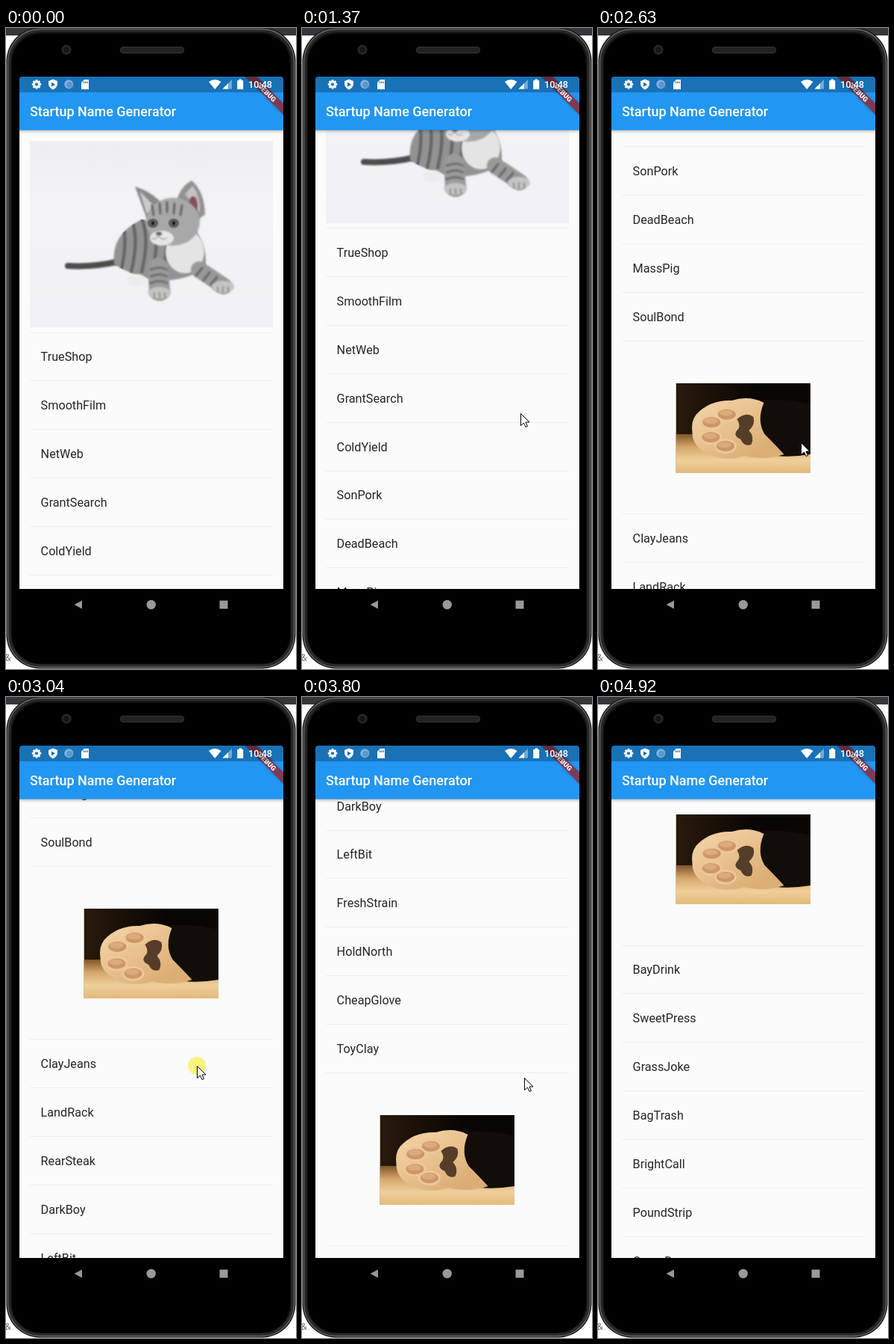
An HTML page with a canvas that plays this animation: 389 by 857 pixels, repeating every 5650 ms.

```html
<!DOCTYPE html>
<html lang="en">
<head>
<meta charset="utf-8">
<title>Startup Name Generator</title>
<style>
html, body { margin: 0; width: 100%; height: 100%; overflow: hidden; background: #fff; }
canvas { display: block; width: 389px; height: 857px; }
</style>
</head>
<body>
<canvas id="stage"></canvas>
<script>
const W = 389, H = 857, LOOP = 5650;
const ROW = 64.9, PHOTO_ROW = 231, FIRST = 407;
const STEP = 69.5, PHASE = 1366, ENTER = 130, LEAVE = 4920;
const COAST_TIME = 120;
const FONT = 'Roboto, "Open Sans", sans-serif';
const dpr = window.devicePixelRatio || 1;

const names = `TrueShop SmoothFilm NetWeb GrantSearch ColdYield SonPork DeadBeach MassPig SoulBond *
  ClayJeans LandRack RearSteak DarkBoy LeftBit FreshStrain HoldNorth CheapGlove ToyClay *
  BayDrink SweetPress GrassJoke BagTrash BrightCall PoundStrip GameDoor`.split(/\s+/);

const swipes = [
  { down: 1150, up: 1340, pull: 93.4, coast: 236.6 },
  { down: 2250, up: 2440, pull: 150, coast: 120 },
  { down: 2850, up: 3040, pull: 176, coast: 190 },
  { down: 3430, up: 3620, pull: 170, coast: 217 },
  { down: 4030, up: 4220, pull: 195.7, coast: 157 }
];

// Pointer stops: time, x, y
const stops = [[130, 361, 846], [620, 290, 694], [1150, 290, 690], [1340, 293, 515],
  [2200, 289, 662], [2440, 272, 490], [2850, 272, 650], [3040, 256, 493], [3430, 276, 680],
  [3620, 298, 509], [3800, 298, 509], [4030, 306, 655], [4220, 298, 510], [4480, 304, 506],
  [4880, 374, 846]];

let g;

function surface(canvas, w, h) {
  canvas.width = Math.round(w * dpr);
  canvas.height = Math.round(h * dpr);
  const c = canvas.getContext('2d');
  c.scale(dpr, dpr);
  return c;
}

// The screen refreshes at a fixed rate once the pointer has entered
function snap(t) {
  if (t < ENTER) return 0;
  return PHASE + Math.floor((Math.min(t, LEAVE) - PHASE) / STEP) * STEP;
}

// A finger accelerates the list, then it coasts to rest
function scrollAt(t) {
  let sum = 0;
  for (const { down, up, pull, coast } of swipes) {
    if (t <= down) break;
    sum += pull * Math.min(1, (t - down) / (up - down)) ** 2;
    if (t > up) sum += coast * (1 - Math.exp((up - t) / COAST_TIME));
  }
  return sum;
}

function pointerAt(t) {
  const next = stops.findIndex(s => s[0] > t);
  if (next === 0) return stops[0].slice(1);
  if (next < 0) return stops[stops.length - 1].slice(1);
  const a = stops[next - 1], b = stops[next];
  const u = (t - a[0]) / (b[0] - a[0]), e = u * u * (3 - 2 * u);
  return [1, 2].map(i => Math.round(a[i] + (b[i] - a[i]) * e));
}

function rect(x, y, w, h, color) {
  g.fillStyle = color;
  g.fillRect(x, y, w, h);
}
function fill(d, color) {
  g.fillStyle = color;
  g.fill(new Path2D(d));
}
function line(d, color, width) {
  g.strokeStyle = color;
  g.lineWidth = width;
  g.stroke(new Path2D(d));
}
function oval(x, y, rx, ry, color, turn = 0) {
  g.fillStyle = color;
  g.beginPath();
  g.ellipse(x, y, rx, ry, turn, 0, Math.PI * 2);
  g.fill();
}
function ring(x, y, w, h, r, color, width) {
  g.strokeStyle = color;
  g.lineWidth = width;
  g.beginPath();
  g.roundRect(x, y, w, h, r);
  g.stroke();
}
function panel(x, y, w, h, r, color) {
  g.fillStyle = color;
  g.beginPath();
  g.roundRect(x, y, w, h, r);
  g.fill();
}
function text(s, x, y, font, color) {
  g.font = font + ' ' + FONT;
  g.fillStyle = color;
  g.fillText(s, x, y);
}
function fade(x0, y0, x1, y1, ...colors) {
  const f = g.createLinearGradient(x0, y0, x1, y1);
  colors.forEach((c, i) => f.addColorStop(i / (colors.length - 1), c));
  return f;
}

function kitten() {
  rect(0, 0, 326, 249, fade(0, 0, 0, 249, '#eeeef2', '#f3f3f6', '#f2f2f6', '#f0f0f6'));
  g.filter = `blur(${0.9 * dpr}px)`;
  g.lineCap = 'round';
  line('M51 167Q85 169 120 161', '#4c4c4c', 8);

  const body = 'M113 165Q108 125 150 105L220 115Q240 145 235 170Q180 205 113 165Z';
  fill(body, '#929292');
  g.save();
  g.clip(new Path2D(body));
  for (let x = 120; x < 190; x += 14) line(`M${x} 100q14 25 2 75`, '#636363', 4);
  g.restore();
  oval(208, 148, 26, 29, '#e4e4e4');
  oval(143, 186, 13, 8, '#ececec');
  line('M172 170L174 200', '#9a9a9a', 28);
  line('M227 172L260 194', '#999', 22);
  for (let i = 0; i < 3; i++) {
    line(`M162 ${172 + i * 9}q12 -5 22 0`, '#666', 2.5);
    line(`M${231 + i * 10} ${170 + i * 6}l-8 10`, '#666', 3);
  }
  for (const [x, y] of [[174, 203], [259, 195]]) {
    oval(x, y, 15, 8, '#c4c4c4');
    for (let i = -1; i < 2; i++) line(`M${x + i * 7} ${y}v7`, '#747474', 1.3);
  }

  fill('M141 61Q166 69 178 85L158 107Z', '#898989');
  fill('M147 67L168 88L157 98Z', '#ccc');
  fill('M197 79Q203 60 217 53Q234 67 235 98L220 110Z', '#929292');
  fill('M208 71L218 60Q229 72 228 96Z', '#c6c1c3');
  oval(219, 86, 6, 12, '#85515e');
  oval(192, 108, 36, 32, '#a8a8a8');
  for (let i = -2; i < 3; i++) line(`M${184 + i * 10} ${82 + Math.abs(i) * 2}l${-i} 13`, '#666', 3);
  oval(177, 130, 16, 10, '#e6e6e6');
  for (const x of [165, 193]) {
    oval(x, 110, 6.5, 5.5, '#303030');
    oval(x, 110, 4.8, 4.2, '#858989');
    oval(x, 110, 2.5, 3, '#111');
  }
  oval(173, 124, 4, 2.5, '#6c5c60');
  line('M173 127q-5 6 -9 3m9 -3q4 7 10 3', '#777', 1);
  g.filter = 'none';
}

function paw(top, t) {
  const bend = (1 - Math.cos((t - 3040) / 1180 * Math.PI * 2)) / 2;
  g.save();
  g.translate(104.5, top);
  g.beginPath();
  g.rect(0, 0, 180.5, 120);
  g.clip();
  rect(0, 0, 181, 120, fade(0, 0, 110, 0, '#291a0b', '#080503'));
  rect(0, 68, 181, 52, fade(0, 68, 0, 120, '#7f562b', '#d5a76c', '#efcf99', '#e2b97c'));
  fill('M100 24Q140 18 181 28V95Q145 101 117 94Z', '#120d09');
  fill('M27 42Q45 22 75 23Q98 16 118 26Q108 50 119 68Q134 83 145 95Q118 104 91 97Q65 106 42 94Q22 84 22 66Q20 51 27 42Z',
    fade(40, 20, 90, 104, '#f3d2a7', '#e9c18f', '#dbae75'));

  // Four pads on an arc that closes towards the palm
  for (let i = 0; i < 4; i++) {
    const a = 4.65 - i * 0.98, r = 1 - bend * 0.14;
    const x = 70 + Math.cos(a) * 29 * r, y = 63 + Math.sin(a) * 24 * r;
    oval(x, y, 15, 10, '#edc897');
    oval(x, y, 12, 7, '#ce966a');
    oval(x - 1, y - 2, 9, 4, '#dcaa7c');
  }
  fill('M82 48Q94 37 104 45Q107 55 98 63Q106 72 101 82Q91 85 87 75Q76 70 82 63Q88 58 82 48Z', '#553d29');
  g.restore();
}

function list(scroll, t) {
  g.save();
  g.beginPath();
  g.rect(18, 136, 354, 614);
  g.clip();
  rect(18, 136, 354, 614, '#fafbfa');
  g.drawImage(photo, 32, Math.round(151 - scroll), 326, 249);
  const rule = y => rect(32, Math.round(y - 0.5), 325.5, 1, '#eee');
  let y = FIRST - scroll;
  rule(y);
  for (const name of names) {
    const isPhoto = name === '*', h = isPhoto ? PHOTO_ROW : ROW;
    if (y < 750 && y + h > 130) {
      if (isPhoto) paw(Math.round(y + 56), t);
      else text(name, 46.6, Math.round(y + 38.4), '400 16.2px', '#252525');
      rule(y + h);
    }
    y += h;
  }
  rect(18, 136, 354, 6, fade(0, 136, 0, 142, 'rgba(0,0,0,.28)', 'rgba(0,0,0,.08)', 'rgba(0,0,0,0)'));
  g.restore();
}

function phone() {
  rect(0, 0, W, H, '#fff');
  rect(0, 0, W, 10, '#37373b');
  g.font = '13px "Noto Sans Mono", monospace';
  g.fillStyle = '#777';
  g.fillText('&', -1, 846);
  panel(0.5, -0.5, 388, 857, 45, '#111');
  ring(4, 3, 381, 850, 42, '#292929', 5);
  ring(2.5, 1.5, 384, 853, 43, '#666', 1.3);
  panel(8, 8, 373, 842, 38, '#000');
  panel(153, 25, 86, 9, 4.5, '#222');
  ring(153.5, 25.5, 85, 8, 4, '#343434', 1);
  oval(81, 29, 6.5, 6.5, '#292929');
  oval(81, 29, 4, 4, '#14151a');
  fill('M91.5 771L102 765.5V776.5Z', '#999');
  oval(194.7, 771, 6.2, 6.2, '#999');
  rect(286.5, 765.5, 11, 11, '#999');
}

function statusIcons() {
  const bar = '#1971b6', white = '#fff';
  g.save();
  g.translate(41, 75.3);
  for (let i = 0; i < 8; i++) {
    rect(-1.4, -6.2, 2.8, 4, white);
    g.rotate(Math.PI / 4);
  }
  g.restore();
  oval(41, 75.3, 4.8, 4.8, white);
  oval(41, 75.3, 2.1, 2.1, bar);
  fill('M63 68.5l6 2.5v4q-.5 5 -6 7.5q-5.5 -2.500 -6 -7.5v-4z', white);
  fill('M61 72.5l5 3l-5 3z', bar);
  oval(84.3, 75.3, 6, 6, '#82b4df');
  oval(85.2, 76, 4.3, 4.3, '#5a99ce');
  fill('M105 69h6v13h-10v-9z', white);
  for (let x = 104; x < 110; x += 2.3) rect(x, 71.5, 1.2, 2.5, bar);
  fill('M272 72q8 -6 16.5 0l-8.3 10z', white);
  fill('M303 69v12.5h-12.5z', '#73a9d3');
  fill('M298 74v7.5h-7.5z', white);
  fill('M312.5 68.5h3.500v1.5h2.2v12h-8v-12h2.3z', white);
  text('10:48', 325, 80, '500 12.6px', white);
}

function header() {
  panel(18, 65, 354, 71.5, [4, 4, 0, 0], '#2196f3');
  text('Startup Name Generator', 32, 118, '500 18px', '#fff');
  g.save();
  g.beginPath();
  g.roundRect(18, 65, 354, 685, [4, 4, 0, 0]);
  g.clip();
  g.save();
  g.translate(372, 65);
  g.rotate(Math.PI / 4);
  g.shadowColor = 'rgba(0,0,0,.4)';
  g.shadowBlur = 3;
  rect(-36, 25.2, 72, 10.8, 'rgba(183,28,28,.63)');
  g.shadowBlur = 0;
  g.textAlign = 'center';
  text('DEBUG', 0, 33.9, '900 9.2px', '#fff');
  g.restore();
  rect(18, 65, 354, 21, 'rgba(0,0,0,.25)');
  g.restore();
  statusIcons();
}

function pointer(t) {
  const [x, y] = pointerAt(t);
  if (swipes.some(s => t >= s.down && t < s.up)) oval(x, y, 12, 12, 'rgba(250,241,95,.8)');
  g.save();
  g.translate(x + 0.5, y + 0.5);
  const arrow = 'M0 0V16L4 12.5L6.5 18L9 17L6.5 11.5H11.5Z';
  fill(arrow, '#fff');
  line(arrow, '#000', 1);
  g.restore();
}

function draw(time) {
  const t = snap(time);
  phone();
  list(scrollAt(t), t);
  header();
  if (time >= ENTER && time < LEAVE) pointer(t);
}

const photo = document.createElement('canvas');
g = surface(photo, 326, 249);
kitten();
g = surface(document.getElementById('stage'), W, H);

const start = performance.now();
function tick() {
  draw((performance.now() - start) % LOOP);
  requestAnimationFrame(tick);
}
tick();
</script>
</body>
</html>
```
